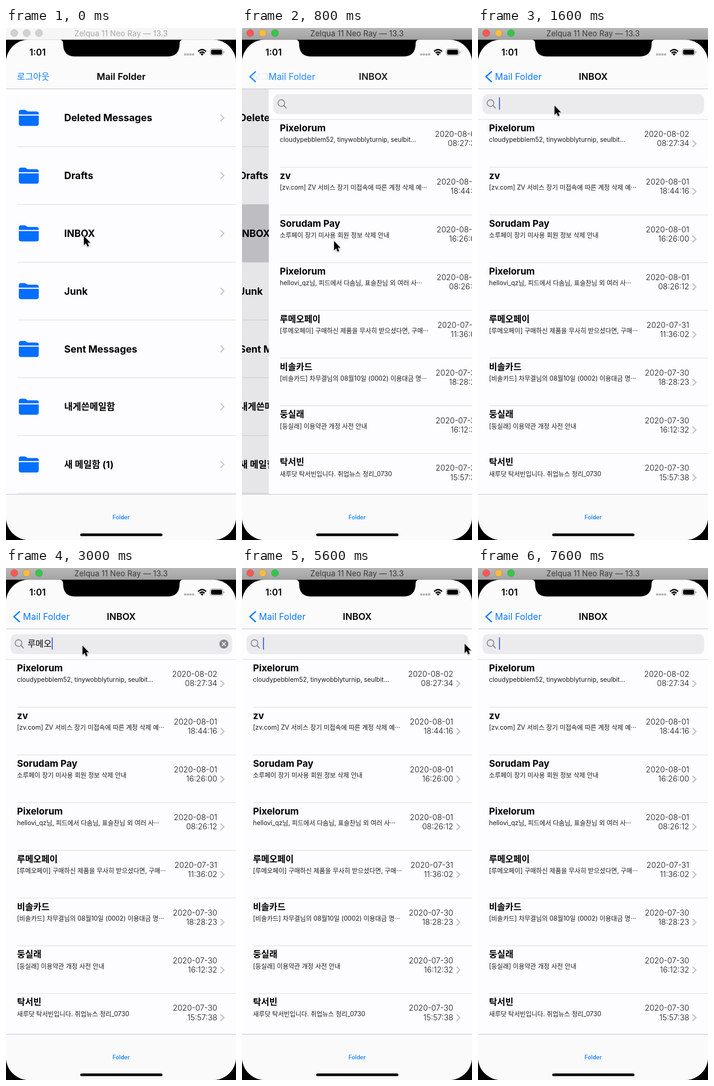
An HTML page for the animation above (7700 ms loop, 502 by 1115 pixels).

```html
<!DOCTYPE html>
<html lang="ko">
<head>
<meta charset="utf-8">
<title>Mail Folder</title>
<style>
  html, body { margin: 0; width: 100%; height: 100%; overflow: hidden; background: #000; }
  svg { display: block; width: 502px; height: 1115px; }
  text { font-family: Inter, "Noto Sans CJK KR", sans-serif; white-space: pre; }
</style>
</head>
<body>
<svg id="stage" viewBox="0 0 502 1115" xmlns="http://www.w3.org/2000/svg"></svg>
<script>
const LOOP = 7700, STEP = 100, WIDTH = 502;
const BLUE = '#0a7aff';

const folders = ['Deleted Messages', 'Drafts', 'INBOX', 'Junk', 'Sent Messages', '내게쓴메일함', '새 메일함 (1)'];

const payMail = ['루메오페이', '[루메오페이] 구매하신 제품을 무사히 받으셨다면, 구매···', '2020-07-31', '11:36:02'];
const cardMail = ['비솔카드', '[비솔카드] 차무결님의 08월10일 (0002) 이용대금 명···', '2020-07-30', '18:28:23'];
const newsMail = ['탁서빈', '새루닷 탁서빈입니다. 취업뉴스 정리_0730', '2020-07-30', '15:57:38'];

const allMails = [
  ['Pixelorum', 'cloudypebblem52, tinywobblyturnip, seulbit...', '2020-08-02', '08:27:34'],
  ['zv', '[zv.com] ZV 서비스 장기 미접속에 따른 계정 삭제 예···', '2020-08-01', '18:44:16'],
  ['Sorudam Pay', '소루페이 장기 미사용 회원 정보 삭제 안내', '2020-08-01', '16:26:00'],
  ['Pixelorum', 'hellovi_qz님, 피드에서 다솜님, 표슬찬님 외 여러 사···', '2020-08-01', '08:26:12'],
  payMail,
  cardMail,
  ['둥실래', '[둥실래] 이용약관 개정 사전 안내', '2020-07-30', '16:12:32'],
  newsMail
];
const foundMails = [
  payMail,
  cardMail,
  newsMail,
  ['루메오', '새로운 환경에서 로그인 되었습니다.', '2020-07-29', '22:40:39'],
  ['루메오페이', '[루메오페이] 결제하신 내역을 안내해드립니다.', '2020-07-23', '21:26:18'],
  ['비솔카드', '[비솔카드] 차무결님의 08월01일 체크카드 이용대금 명···', '2020-07-21', '16:04:54'],
  ['품별서가', '[품별서가] 개인정보 이용내역 통지 안내', '2020-07-18', '15:31:55'],
  ['ospidu', '[ospidu] 오스피두 서비스 제공 법인 상호명 변경 안내', '2020-07-17', '18:11:32']
];

// Timeline tables, in ms
const ACTIVATE = 400, PUSH_START = 500, PUSH_TIME = 600;
const FOCUS = 1500, FILTER = 3300, CLEAR = 4800, POINTER_OUT = 5800;
const typing = [[2000, 'ㄹ'], [2200, '루'], [2300, '룸'], [2500, '루메'], [2700, '루멩'], [2900, '루메오'], [CLEAR, '']];
const pointerPath = [
  [0, 170, 453], [500, 170, 453], [800, 201, 464], [900, 199, 400], [1000, 182, 260],
  [1100, 168, 181], [1300, 167, 169], [3400, 167, 169], [3700, 300, 172],
  [4000, 468, 166], [4200, 489, 166], [4400, 487, 165], [5600, 486, 165]
];

// Drawing helpers
const text = (x, y, str, size, weight = 400, fill = '#000', anchor = 'start', id = '') =>
  `<text ${id && `id="${id}"`} x="${x}" y="${y}" font-size="${size}" font-weight="${weight}" fill="${fill}" text-anchor="${anchor}">${str}</text>`;
const box = (x, y, w, h, fill, r = 0) =>
  `<rect x="${x}" y="${y}" width="${w}" height="${h}" rx="${r}" fill="${fill}"/>`;
const line = (x, y, fill = '#dcdcde') => box(x, y - 0.6, WIDTH - x, 1.2, fill);
const stroke = (d, color, width) =>
  `<path d="${d}" fill="none" stroke="${color}" stroke-width="${width}" stroke-linecap="round" stroke-linejoin="round"/>`;
const chevron = (y, width) => stroke(`M469 ${y - 6.5}l6.6 6.5l-6.6 6.5`, '#c2c2c6', width);
const fit = (str, size) => /[가-힣]/.test(str) ? size * 0.945 : size;

function folderRow(name, i) {
  const top = 132.7 + i * 125.8, mid = top + 63;
  const icon = `<g transform="translate(28 ${mid - 17.5})" fill="#046eff">
    <path d="M0 10V5Q0 0 5 0H12Q14.500 0 16 1.300L17.500 2.500Q18.800 3.500 21 3.500H38Q43.500 3.500 43.500 8.500V10Z"/>
    <path d="M0 12.500H43.500V30Q43.500 35 38.500 35H5Q0 35 0 30Z"/></g>`;
  const shade = i === 2 ? `<rect id="pick" x="0" y="${top}" width="${WIDTH}" height="125.8" fill="#d0d0d5"/>` : '';
  return shade + icon + text(127, mid + 7.6, name, fit(name, 21.3), 700) + chevron(mid, 2.2) + line(24, top + 125.8);
}

function mailRow([name, preview, date, time], i) {
  const top = 199.3 + i * 103.9;
  return text(24, top + 25.7, name, fit(name, 20.4), 700)
    + text(24, top + 49, preview, 13.8, 400, '#1a1a1a')
    + text(461, top + 37.8, date, 16.9, 300, '#111', 'end')
    + text(461, top + 58, time, 16.9, 300, '#111', 'end')
    + chevron(top + 52.7, 2.6)
    + line(24, top + 103.9);
}

const lights = (colors, edge) => colors.map((c, i) =>
  `<circle cx="${18 + i * 27}" cy="11" r="7.800" fill="${c}" stroke="${edge}" stroke-width=".8"/>`).join('');
const windowTitle = fill => text(251, 17.5, 'Zelqua 11 Neo Ray — 13.3', 17, 400, fill, 'middle');

const titleBars = `
  <g id="idleBar">${box(0, 0, WIDTH, 25.5, '#f6f6f6')}${lights(Array(3).fill('#d1d1d1'), '#bcbcbc')}${windowTitle('#a8a8a8')}</g>
  <g id="liveBar">${box(0, 0, WIDTH, 25.5, 'url(#metal)')}${lights(['#fc5753', '#fdbc40', '#34c748'], '#0003')}${windowTitle('#3c3c3c')}</g>`;

const searchBar = box(0, 132, WIDTH, 67, '#fdfcfe') + box(10, 144, 483.5, 43.5, '#ebeaed', 12)
  + `<circle cx="27.300" cy="163.500" r="7.300" fill="none" stroke="#85858a" stroke-width="1.900"/>`
  + stroke('M32.800 169L38 174.300', '#85858a', 2.1)
  + text(47, 172, '', 19, 400, '#000', 'start', 'query')
  + `<rect id="caret" y="151" width="2.200" height="27" rx="1" fill="#3f68d8"/>`
  + `<g id="clear"><circle cx="475.500" cy="165.500" r="9.800" fill="#838388"/>${stroke('M471.700 161.700l7.600 7.600m0-7.600l-7.600 7.600', '#fff', 1.8)}</g>`
  + line(0, 199.3);

const statusBar = text(51, 60, '1:01', 19.6, 600)
  + [389, 394.700, 400.400, 406.100].map(x => box(x, 55.3, 4.6, 4.6, '#b0b0b2', 1.5)).join('')
  + `<g fill="none" stroke="#000" stroke-width="2.900"><path d="M419.300 51.200Q428 42.800 436.700 51.200"/><path d="M422.700 54.900Q428 49.800 433.300 54.900"/></g>
     <path d="M428 60.300l-3.400-3.500Q428 54.200 431.400 56.800Z"/>
     <rect x="445.800" y="45.600" width="27.600" height="14.200" rx="4" fill="none" stroke="#888" stroke-width="1.100"/>`
  + box(447.7, 47.5, 23.8, 10.4, '#000', 2.4)
  + `<path d="M474.800 50.400Q477 51 477 52.700T474.800 55Z" fill="#999"/>`;

const navBar = box(0, 25, WIDTH, 107.5, '#fbfbfc') + line(0, 132.5, '#c3c3c6')
  + text(24, 112.8, '로그아웃', 19.2, 400, BLUE, 'start', 'logout')
  + text(0, 113, 'Mail Folder', 20.1, 600, '#000', 'start', 'oldTitle')
  + text(0, 113, 'Mail Folder', 19.6, 400, BLUE, 'start', 'backLabel')
  + `<g id="backArrow">${stroke('M29.300 95.300L17.300 106L29.300 116.800', BLUE, 3)}</g>`
  + text(0, 113, 'INBOX', 20.1, 600, '#000', 'middle', 'newTitle');

document.getElementById('stage').innerHTML = `
  <defs>
    <linearGradient id="metal" x2="0" y2="1"><stop stop-color="#b8b8b8"/><stop offset="1" stop-color="#a2a2a2"/></linearGradient>
    <clipPath id="glass"><rect y="25.500" width="502" height="1089.500" rx="50"/></clipPath>
  </defs>
  ${box(0, 0, WIDTH, 1115, '#000')}
  <g clip-path="url(#glass)">
    ${box(0, 25, WIDTH, 1090, '#fdfcfe')}
    <g id="folderPage">${folders.map(folderRow).join('')}</g>
    <rect id="dim" y="132" width="502" height="884"/>
    <g id="mailPage">
      ${box(0, 132, WIDTH, 884, '#fdfcfe')}
      <g id="allList">${allMails.map(mailRow).join('')}</g>
      <g id="foundList">${foundMails.map(mailRow).join('')}</g>
      ${searchBar}
    </g>
    ${navBar}
    ${box(0, 1015, WIDTH, 100, '#fafafb')}${line(0, 1015.5, '#c6c6c9')}
    ${text(251.300, 1070, 'Folder', 12.5, 500, BLUE, 'middle')}
    ${box(162, 1100.8, 179.5, 5.8, '#000', 2.9)}
    ${statusBar}
  </g>
  <path d="M116 25Q124 25.500 124.500 33Q124.500 62 150 62H353Q379 62 379 33Q379.500 25.500 387 25Z"/>
  ${titleBars}
  <path id="pointer" d="M0 0V20L4.500 15.800L7.600 23L11 21.600L8 14.500H14Z" stroke="#fff" stroke-width="1.400" paint-order="stroke"
    style="filter:drop-shadow(0 1px 1px #0006)"/>`;

const el = Object.fromEntries([...document.querySelectorAll('#stage [id]')].map(n => [n.id, n]));
const show = (node, on) => node.style.display = on ? '' : 'none';
const move = (node, x, y = 0) => node.setAttribute('transform', `translate(${x} ${y})`);

function pointerAt(t) {
  const next = pointerPath.findIndex(k => k[0] > t);
  if (next < 0) return pointerPath[pointerPath.length - 1].slice(1);
  const [t0, x0, y0] = pointerPath[next - 1], [t1, x1, y1] = pointerPath[next];
  const u = (t - t0) / (t1 - t0);
  return [x0 + (x1 - x0) * u, y0 + (y1 - y0) * u];
}

function caretOn(t) {
  if (t < FOCUS || (t >= FILTER && t < CLEAR)) return false;
  return t < 5000 || t % 1000 >= 500;
}

function render(t) {
  const u = Math.min(1, Math.max(0, (t - PUSH_START) / PUSH_TIME));
  const rest = (1 - u) ** 3.1, done = 1 - rest;

  show(el.idleBar, t < ACTIVATE);
  show(el.liveBar, t >= ACTIVATE);
  show(el.pick, t >= ACTIVATE);

  move(el.folderPage, -150.6 * done);
  move(el.mailPage, WIDTH * rest);
  el.dim.setAttribute('opacity', 0.1 * done);

  move(el.oldTitle, 37 + 161 * rest);
  move(el.backLabel, 37 + 180 * rest);
  move(el.newTitle, 251.5 + 301 * rest);
  el.oldTitle.setAttribute('opacity', Math.max(0, 1 - done * 1.25));
  el.backLabel.setAttribute('opacity', done);
  el.backArrow.setAttribute('opacity', done);
  el.newTitle.setAttribute('opacity', done);
  el.logout.setAttribute('opacity', rest);

  const typed = typing.filter(k => k[0] <= t).pop();
  const query = typed ? typed[1] : '';
  el.query.textContent = query;
  el.caret.setAttribute('x', 45.8 + 18 * query.length);
  show(el.caret, caretOn(t));
  show(el.clear, query);

  const filtered = t >= FILTER && t < CLEAR;
  show(el.allList, !filtered);
  show(el.foundList, filtered);

  move(el.pointer, ...pointerAt(t));
  show(el.pointer, t < POINTER_OUT);
}

function tick() {
  const t = performance.now() % LOOP;
  render(Math.floor(t / STEP) * STEP);
  requestAnimationFrame(tick);
}
tick();
</script>
</body>
</html>
```
